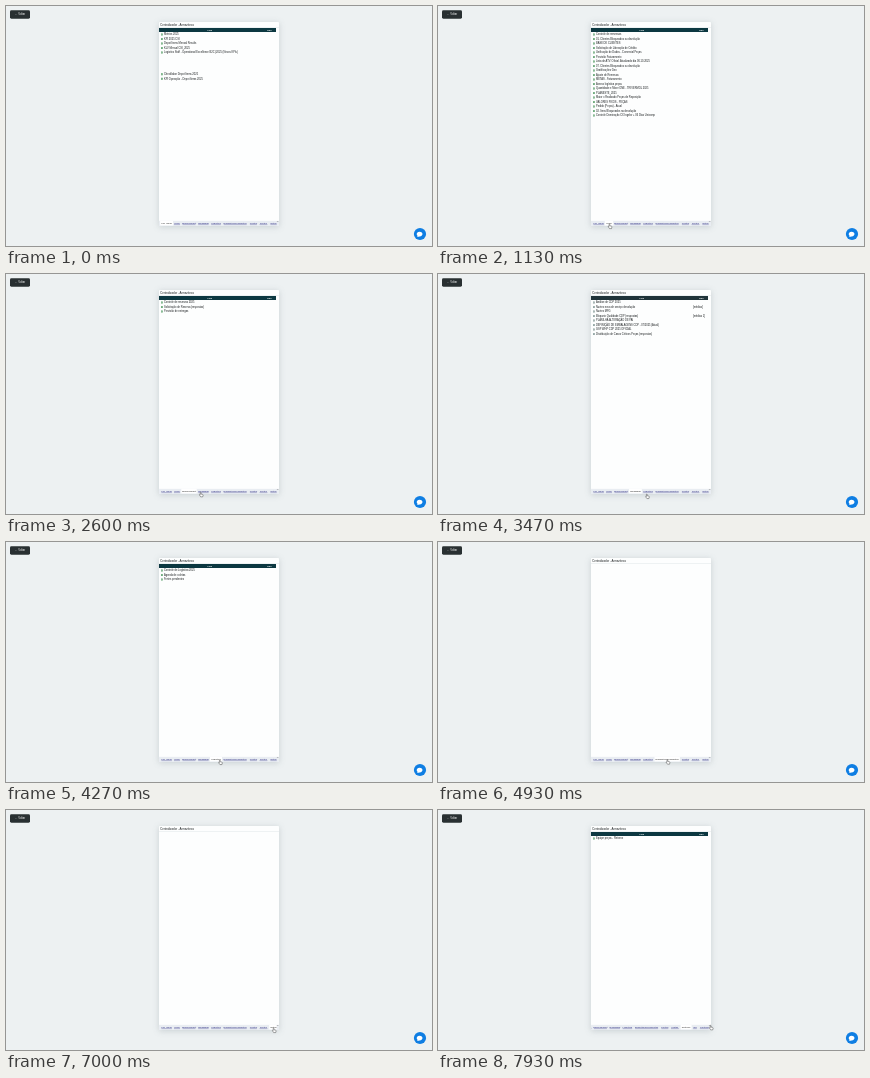
Write an HTML page that moves like this. It is 426 px wide and 240 px high and loops after 8 s.

```html
<!DOCTYPE html>
<html lang="pt">
<head>
<meta charset="utf-8">
<title>Centralizador</title>
<style>
  html, body { margin: 0; width: 100%; height: 100%; overflow: hidden; background: #edf1f2; }
  svg { display: block; width: 100%; height: 100%; font-family: "Liberation Sans", Arial, sans-serif; }
  .card { filter: drop-shadow(0 1px 3px rgba(40, 60, 70, .18)); }
  .row { font-size: 2.58px; fill: #171b1d; }
  .head { font-size: 2.3px; font-weight: bold; fill: #fff; text-anchor: middle; }
  .tab text { font-size: 2.4px; fill: #20207c; text-anchor: middle; }
  .tab rect { fill: none; }
  .tab line { stroke: #20207c; stroke-width: .3; }
  .tab.on text { fill: #222; }
  .tab.on rect { fill: #fff; }
  .tab.on line { display: none; }
</style>
</head>
<body>
<svg viewBox="0 0 426 240">
  <defs><clipPath id="strip"><rect x="153" y="214" width="117.7" height="7"/></clipPath></defs>
  <rect width="426" height="240" fill="#edf1f2"/>

  <rect x="4" y="4.2" width="20" height="8.5" rx="1.4" fill="#293032"/>
  <text x="14.1" y="9.4" font-size="2.7" fill="#fff" text-anchor="middle">← Voltar</text>

  <rect class="card" x="153" y="16" width="120" height="204" rx=".8" fill="#fdfefe"/>
  <text x="154.3" y="19.7" font-size="2.85" fill="#171b1d">Centralizador - Armaziteca</text>
  <rect x="153" y="21.3" width="120" height=".5" fill="#dfe4e6"/>

  <g id="pages"></g>

  <rect x="153" y="214.8" width="120" height="5.2" fill="#e9edf2"/>
  <g clip-path="url(#strip)"><g id="tabs"></g></g>
  <path d="M271.1 215.8l.6-.7.6.7" fill="none" stroke="#555" stroke-width=".4"/>

  <circle cx="414" cy="228" r="6.1" fill="#0f7ee3"/>
  <path d="M411.5 229.7a2.9 2.3 0 1 1 2 .7l-2.2.5z" fill="#fff"/>

  <path id="hand" d="M0 .3q.5-.5.8 0v1.5l1.7.4q.5.2.4.8l-.4 1.6H.5L-.8 2.7q0-.6.8-.1z"
        fill="#fff" stroke="#222" stroke-width=".4"/>
</svg>
<script>
const $ = id => document.getElementById(id);
const LOOP = 8000;
const TEAL = '#0c3841', GREEN = '#4e9a61';

// label, text centre, width
const tabs = [
  ['KPI Value', 160.6, 10.5], ['Links', 171, 6], ['Reservement', 183, 13],
  ['Qualidade', 197.4, 10.4], ['Logística', 210, 9.6], ['Emissão/Documentos', 229.2, 23],
  ['Custos', 247.4, 7], ['Fretes', 257.5, 7.8], ['Retorno', 268.7, 8.6],
  ['ISS', 277.6, 3.6], ['Controle', 287.2, 9.4]
];

// click = tab selected and sheet cleared, load = rows appear
const pages = [
  { click: 0, load: 0, rows: ['Metrics 2025', 'KPI 2025 CSI', 'Depot Items Mensal Results',
    'KLV Mensal CSI_2025', 'Logistics Staff - Operational Excellence B2C (2025 (Novos KPIs)',
    '', '', '', '', 'Checklabor Depot Items 2025', 'KPI Operação - Depot Items 2025'],
    shift: -.6 },
  { click: 930, load: 1130, rows: ['Controle de remessas', '01. Clientes Bloqueados ou devolução',
    'BASE DE CLIENTES', 'Solicitação de Liberação de Crédito', 'Unificação de Dados - Comercial Peças',
    'Previsão Faturamento', 'Lista de ATV. Oficial. Atualizado dia 06.10.2025',
    '07. Clientes Bloqueados ou devolução', 'Gratificações Geo', 'Ajuste de Remessa',
    'METAS - Faturamento', 'Acerca logística peças', 'Quantidade e Mixer ONE - TRIVERMOL 2025',
    'PLANESTE_2025', 'Maior x Realizado Peças de Reposição', 'VALORES FIXOS - PEÇAS',
    'Pedido (Peças) - Atual', '02. Itens Bloqueados na devolução',
    'Controle Dominação CX Ingelor + 06 Dias Unicomp'] },
  { click: 2130, load: 2400, rows: ['Controle de reservas 2025', 'Solicitação de Reserva (respostas)',
    'Previsão de entregas'] },
  { click: 2800, load: 3130, bar: '#20343a', icon: '#7f9494',
    notes: { 1: '[médias]', 3: '[médias 1]' },
    rows: ['Análise de CDP 2025', 'Nuvtes nova de serviço devolução', 'Nuvtes MFG',
    'Bloqueio Qualidade CDP (respostas)', 'PLANILHA ALTERAÇÃO DE PAI',
    'DEFINIÇÃO DE EMBALAGENS CDP - 07/2025 (Atual)', 'GSP WHP CDP 2025 OFICIAL',
    'Distribuição de Casos Críticos Peças (respostas)'] },
  { click: 3730, load: 4000, rows: ['Controle de Logística 2025', 'Agenda de coletas', 'Fretes pendentes'] },
  { click: 4930, load: 5200, rows: ['Emissão de documentos', 'Controle de notas'] },
  { click: 5730, load: 6000, rows: ['Custos 2025', 'Custos de peças'] },
  { click: 6330, load: 6600, rows: ['Tabela de fretes'] },
  { click: 7000, load: 7330, rows: ['Equipe peças - Retorno'] }
];

// time, x, y of the fingertip
const path = [
  [350, 171, 231], [800, 171, 218], [1300, 171, 218], [1800, 184, 218], [2130, 184, 218],
  [2400, 186, 219], [2700, 197, 218], [3270, 197, 218], [3470, 208.4, 220], [3730, 210, 218],
  [4200, 212, 218], [4600, 229, 217.6], [5270, 229, 217.6], [5600, 247, 217.8],
  [6000, 247, 217.8], [6250, 257, 218], [6500, 257, 218], [6800, 267.2, 218],
  [7330, 267.2, 218], [7550, 272.2, 215.3]
];

const ease = u => u * u * (3 - 2 * u);
const ramp = (t, a, b) => ease(Math.min(1, Math.max(0, (t - a) / (b - a))));

function pageMarkup({ rows, bar = TEAL, icon = GREEN, notes = {}, shift = 0 }) {
  const lines = rows.map((label, i) => {
    if (!label) return '';
    const y = 28.4 + i * 4.5 + (i > 5 ? shift : 0);
    const note = notes[i] ? `<text class="row" x="255" y="${y + .9}">${notes[i]}</text>` : '';
    return `<rect x="155" y="${y - 1}" width="1.8" height="2" rx=".3" fill="${icon}"/>
      <rect x="155.5" y="${y - .4}" width=".8" height=".8" fill="#e4eee6"/>
      <text class="row" x="158" y="${y + .9}">${label}</text>${note}`;
  }).join('');
  return `<g><rect x="153" y="22" width="117" height="4" fill="${bar}"/>
    <text class="head" x="203.8" y="24.8">Link</text>
    <text class="head" x="263.5" y="24.8">Obs.</text>${lines}</g>`;
}

$('pages').innerHTML = pages.map(pageMarkup).join('');
$('tabs').innerHTML = tabs.map(([label, x, w]) => `<g class="tab">
  <rect x="${x - w / 2 - 1.2}" y="214.8" width="${w + 2.4}" height="4.6"/>
  <text x="${x}" y="218">${label}</text>
  <line x1="${x - w / 2}" x2="${x + w / 2}" y1="218.6" y2="218.6"/></g>`).join('');

function fingertip(t) {
  const next = path.findIndex(p => p[0] > t);
  if (next < 0) return path[path.length - 1].slice(1);
  const [a, b] = [path[next - 1], path[next]];
  const u = ramp(t, a[0], b[0]);
  return [a[1] + (b[1] - a[1]) * u, a[2] + (b[2] - a[2]) * u];
}

function draw(t) {
  const active = pages.filter(p => p.click <= t).length - 1;
  [...$('pages').children].forEach((g, i) =>
    g.setAttribute('display', i === active && t >= pages[i].load ? 'inline' : 'none'));
  [...$('tabs').children].forEach((g, i) => g.classList.toggle('on', i === active));
  $('tabs').setAttribute('transform', `translate(${-20.6 * ramp(t, 7600, 7900)} 0)`);

  const visible = t >= path[0][0];
  $('hand').setAttribute('display', visible ? 'inline' : 'none');
  if (visible) $('hand').setAttribute('transform', `translate(${fingertip(t)})`);
}

const start = performance.now();
function tick() {
  draw((performance.now() - start) % LOOP);
  requestAnimationFrame(tick);
}
tick();
</script>
</body>
</html>
```
